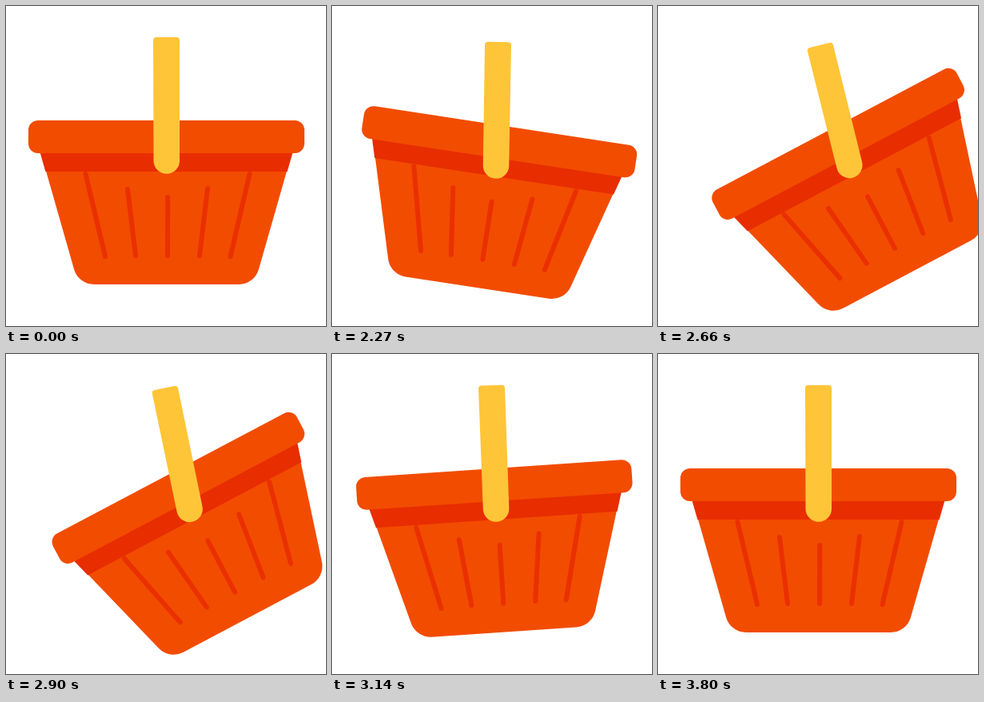
An HTML page for the animation above (3.83 s loop, 400 px wide and 400 px high).

```html
<!DOCTYPE html>
<html lang="en">
<head>
<meta charset="utf-8">
<title>Swinging basket</title>
<style>
  html, body { margin: 0; width: 100%; height: 100%; overflow: hidden; background: #fff; }
  svg { display: block; width: 100%; height: 100%; }
</style>
</head>
<body>
<svg viewBox="0 0 400 400">
  <g id="basket">
    <path fill="#f24c00" d="M42.5 180 L85.2 329.4 A26 26 0 0 0 110 348 H291 A26 26 0 0 0 315.8 329.4 L358.5 180 Z"/>
    <path fill="#e82d00" d="M42.5 183 H358.5 L351.6 207 H49.4 Z"/>
    <rect x="28" y="143" width="345" height="41" rx="12" fill="#f24c00"/>
    <path fill="none" stroke="#ea3000" stroke-width="6" stroke-linecap="round"
      d="M99.5 210 L124 313 M152 229 L162 312 M202.2 239 L202 312 M252 228 L242 312 M304.5 210 L280.5 313"/>
  </g>
  <path id="handle" fill="#ffc538" d="M184 43 Q184 39 188 39 H213 Q217 39 217 43 V193.5 A16.25 16.25 0 0 1 184.5 193.5 Z"/>
</svg>
<script>
  const LOOP = 3830, STEP = 30, MOVE_START = 2000;
  const PIVOT = { x: 200.5, y: 193 };

  // Each track lists [time in ms, value]; values ease in and out between keys.
  const basketAngle = [[2010, 0], [2180, 11], [2780, -32], [3380, 11], [3800, 0]];
  const handleAngle = [[2010, 0], [2180, 2.1], [2740, -14.7], [3267, 0]];
  const shiftX = [[2150, 0], [2710, 39.2], [3258, 0]];
  const shiftY = [[2010, 0], [2430, 8.7], [2980, 0]];

  const basket = document.getElementById('basket');
  const handle = document.getElementById('handle');

  function valueAt(track, t) {
    const next = track.findIndex(([time]) => time > t);
    if (next === 0) return track[0][1];
    if (next < 0) return track[track.length - 1][1];
    const [t0, v0] = track[next - 1];
    const [t1, v1] = track[next];
    const eased = (1 - Math.cos(Math.PI * (t - t0) / (t1 - t0))) / 2;
    return v0 + (v1 - v0) * eased;
  }

  function place(part, x, y, angle) {
    part.setAttribute('transform', `translate(${x} ${y}) rotate(${angle} ${PIVOT.x} ${PIVOT.y})`);
  }

  function draw(now) {
    const t = MOVE_START + Math.floor((now % LOOP - MOVE_START) / STEP) * STEP;
    const x = valueAt(shiftX, t);
    const y = valueAt(shiftY, t);
    place(basket, x, y, valueAt(basketAngle, t));
    place(handle, x, y, valueAt(handleAngle, t));
  }

  const start = performance.now();
  function tick() {
    draw(performance.now() - start);
    requestAnimationFrame(tick);
  }
  tick();
</script>
</body>
</html>
```
